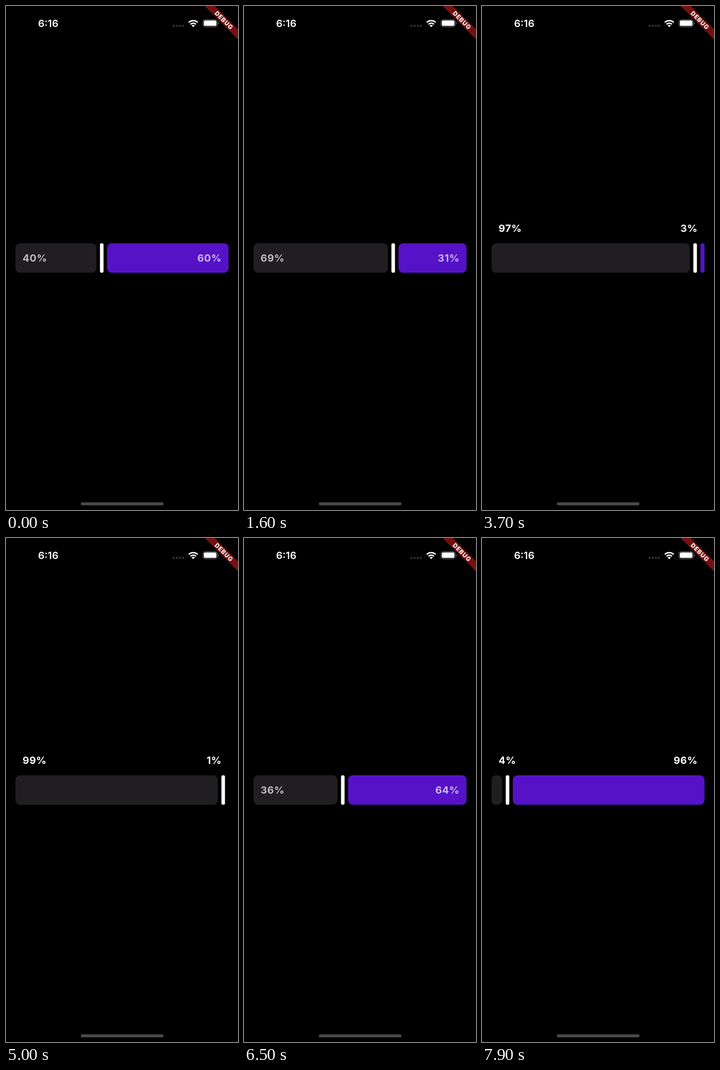
An HTML page that plays this animation: 508x1102 px, repeating every 8000 ms.

```html
<!DOCTYPE html>
<html lang="en">
<head>
<meta charset="utf-8">
<title>Split slider</title>
<style>
  html, body { margin: 0; width: 100%; height: 100%; overflow: hidden; background: #000; }
  svg { display: block; width: 508px; height: 1102px; }
  text { font-family: Inter, Roboto, sans-serif; fill: #fff; }
  .label { font-size: 22px; font-weight: 700; letter-spacing: .6px; }
  .clock { font-size: 22px; font-weight: 600; }
  .debug { font-size: 13.2px; font-weight: 800; letter-spacing: 1px; }
</style>
</head>
<body>
<svg viewBox="0 0 508 1102">
  <text class="clock" x="92.5" y="46" text-anchor="middle">6:16</text>
  <g fill="#333">
    <circle cx="367" cy="43.4" r="2.4"/><circle cx="373.9" cy="43.4" r="2.4"/>
    <circle cx="380.8" cy="43.4" r="2.4"/><circle cx="387.6" cy="43.4" r="2.4"/>
  </g>
  <g fill="none" stroke="#fff" stroke-width="3.1">
    <path d="M400.2 36A14 14 0 0 1 419.8 36"/>
    <path d="M404 40A8.6 8.6 0 0 1 416 40"/>
    <path d="M406.4 42.6A5.2 5.2 0 0 1 413.6 42.6L410 46.2Z" fill="#fff" stroke="none"/>
  </g>
  <rect x="431.2" y="29.6" width="31.6" height="16" rx="5" fill="none" stroke="#666" stroke-width="1.3"/>
  <rect x="433.2" y="31.6" width="27.6" height="12" rx="3.2" fill="#fff"/>
  <path d="M464.2 35a3 3 0 0 1 0 5.4z" fill="#666"/>

  <path d="M435 0H457L508 51V73Z" fill="#b71c1c" fill-opacity=".627"/>
  <text class="debug" transform="translate(477 31) rotate(45)" x=".5" y="4.8" text-anchor="middle">DEBUG</text>

  <rect id="left" x="20.7" y="518.7" height="64.6" fill="#201e20"/>
  <rect id="handle" y="518.7" width="7.8" height="64.6" rx="3.6" fill="#fff"/>
  <rect id="right" y="518.7" height="64.6" fill="#5612c7"/>
  <text class="label" id="leftLabel" x="36.3"></text>
  <text class="label" id="rightLabel" x="472.2" text-anchor="end"></text>

  <rect x="163.8" y="1085.3" width="181" height="6.4" rx="3.2" fill="#4a4a4a"/>
</svg>
<script>
const LOOP = 8000, STEP = 100, LAG = 75, RISE = 250;
const LEFT = 20.7, TRACK = 443.3, GAP = 7.76;

// Drag path: [time in ms, left share in percent]
const keys = [
  [400, 40], [800, 46], [1200, 55.5], [1525, 66.4], [1600, 69.1], [1900, 79],
  [2200, 84.5], [2425, 86.8], [2700, 86.8], [2725, 87.1], [2800, 88.1],
  [3000, 92.3], [3225, 97.1], [3500, 97.1], [3600, 97.98], [3900, 97.98],
  [4125, 100], [4900, 100], [5300, 98], [5525, 94.6], [5600, 93.2],
  [5800, 86], [6100, 65.5], [6425, 41.5], [6500, 36.4], [6700, 24],
  [7000, 13], [7325, 8], [7600, 8], [7700, 7], [7825, 5.3], [7900, 4.4]
];

const slope = i => (keys[i + 1][1] - keys[i][1]) / (keys[i + 1][0] - keys[i][0]);

// Monotone tangent: flat at rests, harmonic mean elsewhere
function tangent(i) {
  if (i === 0 || i === keys.length - 1) return 0;
  const a = slope(i - 1), b = slope(i);
  return a * b > 0 ? 2 * a * b / (a + b) : 0;
}

function drag(t) {
  const i = keys.findIndex(k => k[0] > t) - 1;
  if (i === -1) return keys[0][1];
  if (i < 0) return keys[keys.length - 1][1];
  const [t0, v0] = keys[i], [t1, v1] = keys[i + 1];
  const d = t1 - t0, s = (t - t0) / d, r = 1 - s;
  return r * r * ((1 + 2 * s) * v0 + s * d * tangent(i))
       + s * s * ((1 + 2 * r) * v1 - r * d * tangent(i + 1));
}

// Share of the last RISE ms spent close to an end, eased
function lift(t) {
  let n = 0;
  for (let k = 0; k < 25; k++) n += Math.abs(drag(t - k * RISE / 25) - 50) > 30;
  const u = n / 25;
  return u * u * (3 - 2 * u);
}

const $ = id => document.getElementById(id);
const set = (id, attrs) => {
  for (const name in attrs) $(id).setAttribute(name, attrs[name]);
};

function bar(id, x, w) {
  set(id, { x, width: w, rx: Math.min(10.3, w / 2) });
}

function draw(now) {
  const t = Math.floor(now % LOOP / STEP) * STEP;
  const w = TRACK * drag(t - LAG) / 100;
  bar("left", LEFT, w);
  set("handle", { x: LEFT + w + GAP });
  bar("right", LEFT + w + 3 * GAP, Math.max(0, TRACK - w));

  const share = Math.floor(drag(t) + 1e-6), up = lift(t);
  const pose = { y: 559 - 64.6 * up, "fill-opacity": .7 + .3 * up };
  $("leftLabel").textContent = share + "%";
  $("rightLabel").textContent = 100 - share + "%";
  set("leftLabel", pose);
  set("rightLabel", pose);
}

const start = performance.now();
function frame() {
  draw(performance.now() - start);
  requestAnimationFrame(frame);
}
frame();
</script>
</body>
</html>
```
